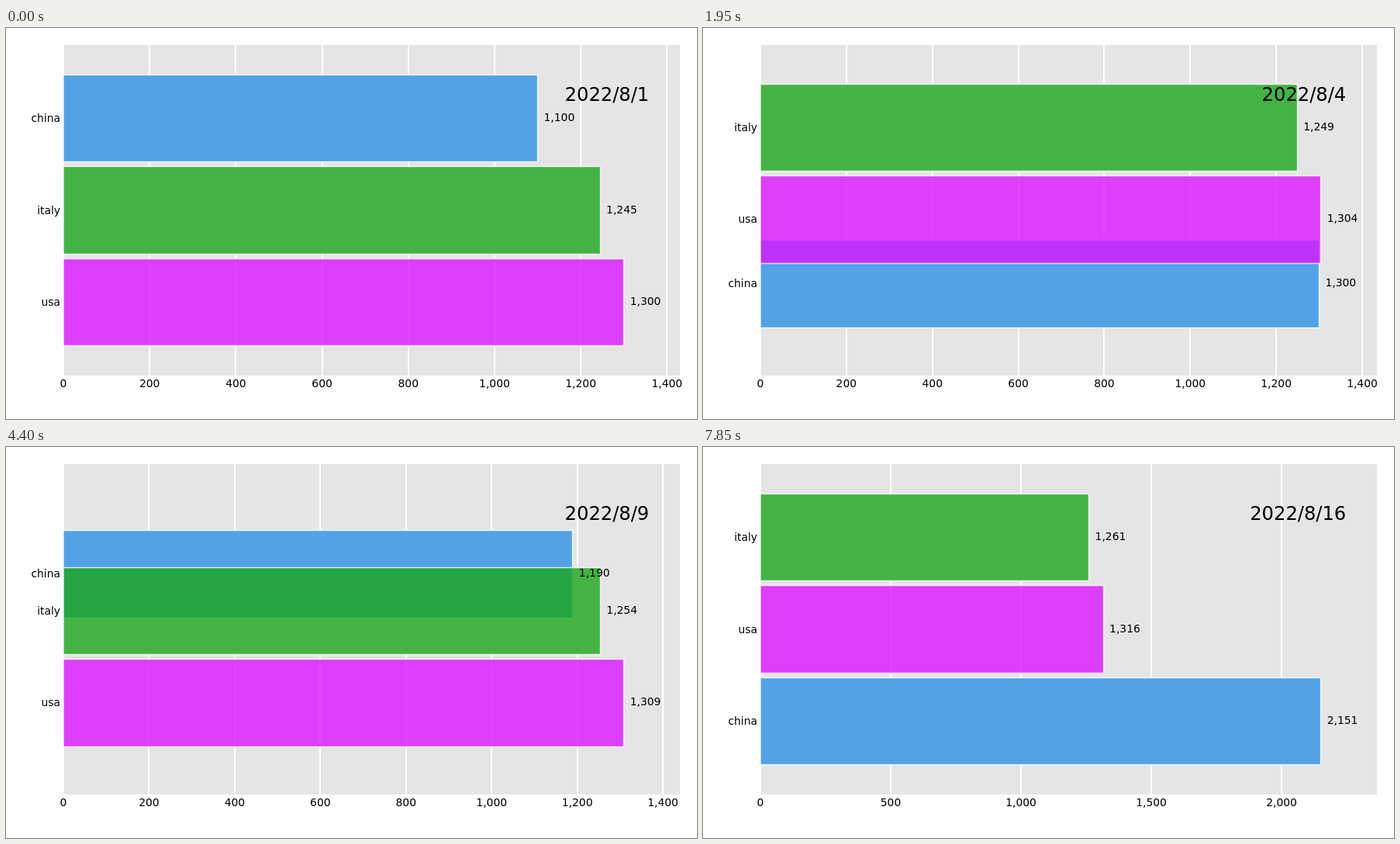
An HTML page with a canvas for the animation above (8000 ms loop, 891x504 px).

```html
<!DOCTYPE html>
<html lang="en">
<head>
<meta charset="utf-8">
<title>Bar chart race</title>
<style>
  html, body { margin: 0; width: 100%; height: 100%; overflow: hidden; background: #fefefe; }
  canvas { display: block; width: 891px; height: 504px; }
</style>
</head>
<body>
<canvas width="891" height="504"></canvas>
<script>
const ctx = document.querySelector('canvas').getContext('2d');

// Plot area, in pixels
const LEFT = 74, TOP = 22, WIDTH = 795, HEIGHT = 426;
const LOWEST = 116.5, ROW = 118.5, BAR = 112.5;
const PANEL = '#e5e5e5';
const FONT = '"DejaVu Sans", Verdana, sans-serif';

// Timing: ten steps per day
const STEP = 50, PER_DAY = 10, LOOP = 8000, LAST = 157;

const rising = first => Array.from({ length: 17 }, (_, day) => first + day);
const series = [
  { name: 'china', color: '#2e91e5', hideGrid: true,
    values: [1100, 1200, 1250, 1100, 1322, 1390, 1500, 1600, 1360, 1147,
             1100, 2347, 2147, 2148, 2149, 2150, 2151] },
  { name: 'italy', color: '#1ca71c', hideGrid: true, values: rising(1245) },
  { name: 'usa', color: '#da16ff', values: rising(1300) }
];

const rank = (s, day) => series.filter(o => o.values[day] < s.values[day]).length;
const mix = (a, b, step) => (a * (PER_DAY - step) + b * step) / PER_DAY;
const snap = v => Math.floor(v) + 0.5;

// Rounds halves to the even neighbour
function format(v) {
  let n = Math.round(v);
  if (v % 1 === 0.5 && n % 2) n--;
  return n.toLocaleString('en-US');
}

// Smallest round interval that leaves at most nine parts
function tickSize(limit) {
  const raw = limit / 9;
  const unit = 10 ** Math.floor(Math.log10(raw));
  return [1, 2, 2.5, 5, 10].find(m => m * unit >= raw) * unit;
}

function text(str, x, y, align, size = 13.89) {
  ctx.font = `${size}px ${FONT}`;
  ctx.textAlign = align;
  ctx.fillStyle = '#000';
  ctx.fillText(str, x, y);
}

function drawBar(b) {
  const x = snap(b.end), y = snap(b.y - BAR / 2), bottom = snap(b.y + BAR / 2);
  ctx.globalAlpha = 0.8;
  ctx.fillStyle = b.color;
  ctx.fillRect(LEFT, y, x - LEFT, bottom - y);
  ctx.strokeStyle = '#fff';
  ctx.lineWidth = 1.5;
  ctx.strokeRect(LEFT, y, x - LEFT, bottom - y);
  ctx.globalAlpha = 1;
}

function draw(frame) {
  const day = Math.floor(frame / PER_DAY), step = frame % PER_DAY;
  const next = Math.min(day + 1, 16);
  const bars = series.map(s => ({
    ...s,
    value: mix(s.values[day], s.values[next], step),
    y: LOWEST + ROW * mix(rank(s, day), rank(s, next), step)
  }));
  const limit = 1.1 * Math.max(...bars.map(b => b.value));
  const toX = v => LEFT + WIDTH * v / limit;
  bars.forEach(b => b.end = toX(b.value));

  ctx.fillStyle = '#fefefe';
  ctx.fillRect(0, 0, 891, 504);

  ctx.save();
  ctx.beginPath();
  ctx.rect(LEFT, TOP, WIDTH, HEIGHT);
  ctx.clip();
  ctx.fillStyle = PANEL;
  ctx.fillRect(LEFT, TOP, WIDTH, HEIGHT);

  const size = tickSize(limit), ticks = [];
  for (let v = 0; v <= limit + 1e-6; v += size) ticks.push(v);
  ctx.fillStyle = '#fff';
  ticks.forEach(v => ctx.fillRect(Math.round(toX(v)) - 1, TOP, 2, HEIGHT));

  ctx.fillStyle = PANEL;
  bars.filter(b => b.hideGrid).forEach(b =>
    ctx.fillRect(LEFT, b.y - BAR / 2, b.end - LEFT, BAR));
  bars.forEach(drawBar);
  ctx.restore();

  ticks.forEach(v => text(format(v), toX(v), 463, 'center'));
  bars.forEach(b => {
    text(b.name, 70, Math.floor(b.y + 5), 'right');
    text(format(b.value), b.end + 7.95, Math.floor(b.y + 4), 'left');
  });
  text(`2022/8/${day + 1}`, 829.25, 94, 'right', 24.2);
}

let shown = -1;
const start = performance.now();
function tick() {
  const t = Math.max(0, performance.now() - start) % LOOP;
  const frame = Math.min(Math.floor(t / STEP), LAST);
  if (frame !== shown) draw(shown = frame);
  requestAnimationFrame(tick);
}
tick();
</script>
</body>
</html>
```
